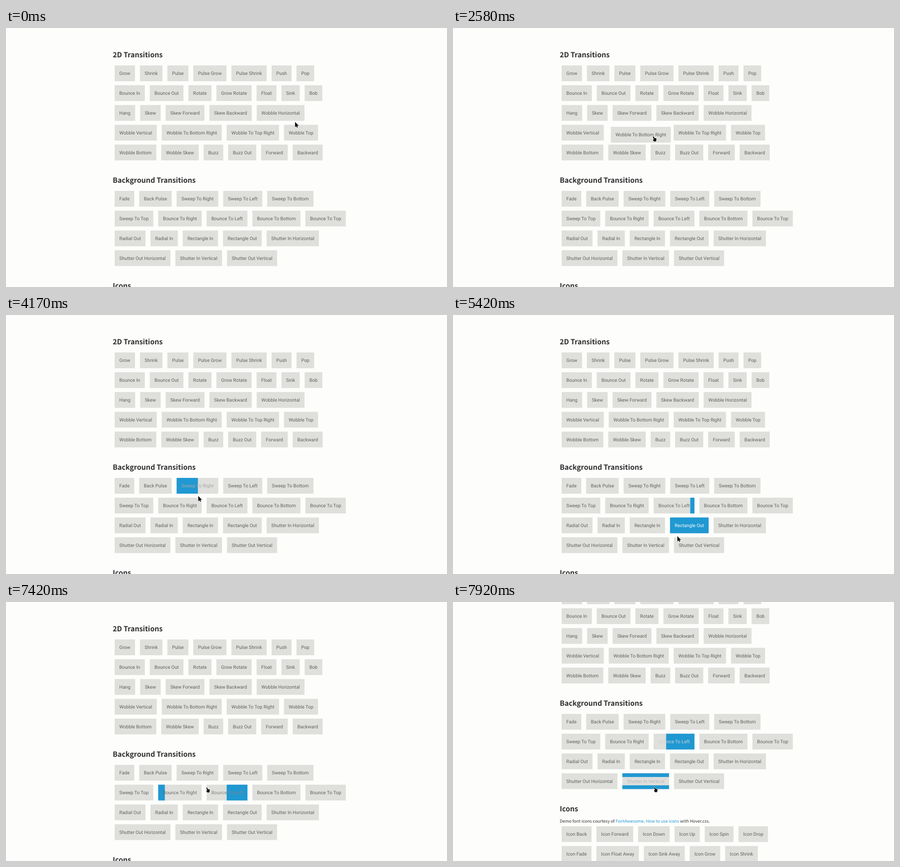
Recreate the animation shown at these times as an HTML page with a canvas. Size 975x574 px, loop 8000 ms.

```html
<!DOCTYPE html>
<html lang="en">
<head>
<meta charset="utf-8">
<title>Hover transitions</title>
<style>
  html, body { margin: 0; width: 100%; height: 100%; overflow: hidden; background: #fdfdfc; }
  canvas { display: block; }
</style>
</head>
<body>
<canvas id="stage" width="975" height="574"></canvas>
<script>
const ctx = document.getElementById('stage').getContext('2d');
const LOOP = 8000, STEP = 1000 / 12;
const EM = 10.4, HEIGHT = 35, PITCH = 43.85, LEFT = 236;
const BUTTON_FONT = `${EM}px Roboto, sans-serif`;
const SANS = '"Noto Sans CJK JP", "Noto Sans CJK SC", "Noto Sans CJK", "Noto Sans", sans-serif';
const PAGE = '#fdfdfc', GRAY = '#dfdfdc', BLUE = '#2098d1', TEXT_SHADE = 96;

const SECTIONS = [
  { title: '2D Transitions', top: 83, rows: [
    'Grow|Shrink|Pulse|Pulse Grow|Pulse Shrink|Push|Pop',
    'Bounce In|Bounce Out|Rotate|Grow Rotate|Float|Sink|Bob',
    'Hang|Skew|Skew Forward|Skew Backward|Wobble Horizontal',
    'Wobble Vertical|Wobble To Bottom Right|Wobble To Top Right|Wobble Top',
    'Wobble Bottom|Wobble Skew|Buzz|Buzz Out|Forward|Backward'] },
  { title: 'Background Transitions', top: 361, rows: [
    'Fade|Back Pulse|Sweep To Right|Sweep To Left|Sweep To Bottom',
    'Sweep To Top|Bounce To Right|Bounce To Left|Bounce To Bottom|Bounce To Top',
    'Radial Out|Radial In|Rectangle In|Rectangle Out|Shutter In Horizontal',
    'Shutter Out Horizontal|Shutter In Vertical|Shutter Out Vertical'] },
  { title: 'Icons', top: 610, note: true, rows: [
    'Icon Back|Icon Forward|Icon Down|Icon Up|Icon Spin|Icon Drop',
    'Icon Fade|Icon Float Away|Icon Sink Away|Icon Grow|Icon Shrink'] },
];

// Turning points of the pointer: time, x, y. Hovering follows from this path.
const PATH = [
  [0, 639, 207], [560, 550, 188], [1113, 375, 182], [1417, 359, 142], [1720, 368, 136],
  [1960, 440, 104], [2300, 482, 200], [2382, 482, 248], [2583, 444, 240], [3000, 312, 268],
  [3480, 395, 285], [3640, 600, 322], [3800, 440, 390], [4167, 425, 400], [4600, 433.5, 424],
  [4980, 488, 437], [5417, 496, 489], [5800, 440, 512], [6150, 310, 508], [6500, 300, 462],
  [6750, 345, 430], [7040, 433.5, 414], [7300, 444.3, 411], [LOOP, 446.5, 410],
];
const HOVER_LAG = 50;
const SCROLL = { start: 7420, ms: 280, distance: 113, settled: 7770 };

const clamp = x => Math.min(1, Math.max(0, x));
const mix = (a, b, k) => a + (b - a) * k;

function bezier(x1, y1, x2, y2) {
  const curve = (a, b, s) => 3 * (1 - s) ** 2 * s * a + 3 * (1 - s) * s * s * b + s ** 3;
  return x => {
    if (x <= 0) return 0;
    if (x >= 1) return 1;
    let low = 0, high = 1;
    for (let i = 0; i < 24; i++) {
      const mid = (low + high) / 2;
      if (curve(x1, x2, mid) < x) low = mid; else high = mid;
    }
    return curve(y1, y2, low);
  };
}
const ease = bezier(.25, .1, .25, 1);
const easeOut = bezier(0, 0, .58, 1);
const easeInOut = bezier(.42, 0, .58, 1);
const shrinkBounce = bezier(.47, 2.02, .31, -.36);
const fillBounce = bezier(.52, 1.64, .37, .66);

// Six eased swings in a second, alternating sides and dying down evenly.
function wobble(ms, peak) {
  const pos = clamp(ms / 1000) * 6, i = Math.min(5, Math.floor(pos));
  const swing = n => n && n < 6 ? peak * (-1) ** (n + 1) * (5 - n) / 4 : 0;
  return mix(swing(i), swing(i + 1), easeInOut(pos - i));
}

function skew(degrees, originY) {
  ctx.translate(0, originY);
  ctx.transform(1, 0, Math.tan(degrees * Math.PI / 180), 1, 0, 0);
  ctx.translate(0, -originY);
}
const zoom = k => ctx.scale(k, k);
const box = (x, y, w, h) => ctx.fillRect(x, y, w, h);
const centred = (w, h) => box(-w / 2, -h / 2, w, h);

// Moves and fills get the transition progress; loops get the time since entering.
const MOVES = {
  'Skew Forward': { run: v => skew(-10 * v, HEIGHT / 2) },
  'Skew Backward': { run: v => skew(10 * v, HEIGHT / 2) },
  'Bounce Out': { run: v => zoom(1 - .2 * v), ms: 500, enter: shrinkBounce },
  'Rotate': { run: v => ctx.rotate(4 * v * Math.PI / 180) },
};
const LOOPS = {
  'Wobble Horizontal': ms => ctx.translate(wobble(ms, EM / 2), 0),
  'Wobble To Bottom Right': ms => { const d = wobble(ms, EM / 2); ctx.translate(d, d); },
  'Wobble Bottom': ms => skew(wobble(ms, -12), -HEIGHT / 2),
  'Wobble Skew': ms => skew(wobble(ms, -12), 0),
  'Pulse Grow': ms => zoom(1 + .1 * ease(1 - Math.abs(1 - ms / 300 % 2))),
};
const fromLeft = (v, w) => box(-w / 2, -HEIGHT / 2, w * v, HEIGHT);
const fromRight = (v, w) => box(w / 2 - w * v, -HEIGHT / 2, w * v, HEIGHT);
const FILLS = {
  'Sweep To Right': { run: fromLeft },
  'Bounce To Right': { run: fromLeft, ms: 500, enter: fillBounce },
  'Bounce To Left': { run: fromRight, ms: 500, enter: fillBounce },
  'Rectangle Out': { run: (v, w) => centred(w * v, HEIGHT * v) },
  'Shutter Out Horizontal': { run: (v, w) => centred(w * v, HEIGHT) },
  'Shutter In Vertical': { run: (v, w) => {
    const bar = HEIGHT * v / 2;
    box(-w / 2, -HEIGHT / 2, w, bar);
    box(-w / 2, HEIGHT / 2 - bar, w, bar);
  } },
  'Radial Out': { run: (v, w) => {
    ctx.save();
    ctx.beginPath();
    ctx.rect(-w / 2, -HEIGHT / 2, w, HEIGHT);
    ctx.clip();
    ctx.beginPath();
    ctx.ellipse(0, 0, w * v, HEIGHT * v, 0, 0, 7);
    ctx.fill();
    ctx.restore();
  } },
};

function layout() {
  ctx.font = BUTTON_FONT;
  const gap = EM * .8 + ctx.measureText(' ').width;
  return SECTIONS.flatMap(({ top, rows }) => rows.flatMap((row, i) => {
    let x = LEFT + EM * .4;
    return row.split('|').map(name => {
      const w = ctx.measureText(name).width + EM * 2;
      const button = { name, x, y: top + i * PITCH, w };
      x += w + gap;
      return button;
    });
  }));
}

function pointerAt(t) {
  const i = Math.max(1, PATH.findIndex(p => p[0] > t));
  const [a, b] = [PATH[i - 1], PATH[i]];
  const k = (t - a[0]) / (b[0] - a[0]);
  return { x: mix(a[1], b[1], k), y: mix(a[2], b[2], k) };
}

// Buttons under the pointer are looked up again only once scrolling has settled.
function buttonAt(t) {
  const { x, y } = pointerAt(t);
  const pageY = y + (t < SCROLL.settled ? 0 : SCROLL.distance);
  return BUTTONS.find(b => x >= b.x && x < b.x + b.w && pageY >= b.y && pageY < b.y + HEIGHT);
}

function findHovers() {
  const hovers = [];
  let current;
  for (let t = 0; t + HOVER_LAG < LOOP; t += 2) {
    const button = buttonAt(t), at = t + HOVER_LAG;
    if (button === current) continue;
    if (current) hovers.at(-1).leave = at;
    if (button) hovers.push({ button, enter: at, leave: LOOP });
    current = button;
  }
  return hovers;
}

function progress(t, { enter, leave }, ms, onCurve, offCurve) {
  const rise = at => onCurve((at - enter) / ms);
  return t < leave ? rise(t) : rise(leave) * (1 - offCurve((t - leave) / ms));
}

function drawButton(button, t) {
  const { name, x, y, w } = button;
  const hover = HOVERS.findLast(h => h.button === button && t >= h.enter);
  const move = hover && MOVES[name], fill = hover && FILLS[name];
  let shade = TEXT_SHADE;
  ctx.save();
  ctx.translate(x + w / 2, y + HEIGHT / 2);
  if (move) move.run(progress(t, hover, move.ms || 300, move.enter || ease, ease));
  if (hover && LOOPS[name] && t < hover.leave) LOOPS[name](t - hover.enter);
  ctx.fillStyle = GRAY;
  centred(w, HEIGHT);
  if (fill) {
    const ms = fill.ms || 300;
    ctx.fillStyle = BLUE;
    fill.run(progress(t, hover, ms, fill.enter || easeOut, easeOut), w);
    shade = Math.round(mix(TEXT_SHADE, 255, progress(t, hover, ms, ease, ease)));
  }
  ctx.fillStyle = `rgb(${shade},${shade},${shade})`;
  ctx.fillText(name, EM - w / 2, 3.7);
  ctx.restore();
}

function drawNote(y) {
  const parts = ['Demo font icons courtesy of ', 'FontAwesome', '. ', 'How to use icons', ' with Hover.css.'];
  let x = LEFT;
  ctx.font = `9.4px ${SANS}`;
  parts.forEach((text, i) => {
    ctx.fillStyle = i % 2 ? BLUE : '#333';
    ctx.fillText(text, x, y);
    x += ctx.measureText(text).width;
  });
}

function drawSection({ title, top, note }) {
  ctx.font = `bold 15.7px ${SANS}`;
  ctx.fillStyle = '#2e2e2e';
  ctx.fillText(title, LEFT, top - (note ? 33 : 18));
  if (note) drawNote(top - 8.5);
}

const ARROW = new Path2D('M0 1V13L2.7 10.6 4.3 14 6.2 13.1 4.7 9.8H8.3Z');
const HAND = new Path2D('M-2 1.2 -.4 0 1.5 3.6 5 4.4 6 6 5.6 9 4.6 11.5H.4L-2 8 -1 6.8 .2 7Z');
function drawPointer(t) {
  const { x, y } = pointerAt(t);
  const shape = buttonAt(t) ? HAND : ARROW;
  ctx.save();
  ctx.translate(x, y);
  ctx.strokeStyle = '#fff';
  ctx.lineWidth = 1.2;
  ctx.stroke(shape);
  ctx.fillStyle = '#111';
  ctx.fill(shape);
  ctx.restore();
}

ctx.textRendering = 'geometricPrecision';
const BUTTONS = layout();
const HOVERS = findHovers();

function draw(now) {
  const t = Math.floor((now % LOOP + 4) / STEP) * STEP % LOOP;
  ctx.fillStyle = PAGE;
  box(0, 0, 975, 574);
  ctx.save();
  ctx.translate(0, -SCROLL.distance * easeInOut((t - SCROLL.start) / SCROLL.ms));
  SECTIONS.forEach(drawSection);
  ctx.font = BUTTON_FONT;
  for (const button of BUTTONS) drawButton(button, t);
  ctx.restore();
  drawPointer(t);
}

const start = performance.now();
function tick() {
  draw(performance.now() - start);
  requestAnimationFrame(tick);
}
tick();
</script>
</body>
</html>
```
